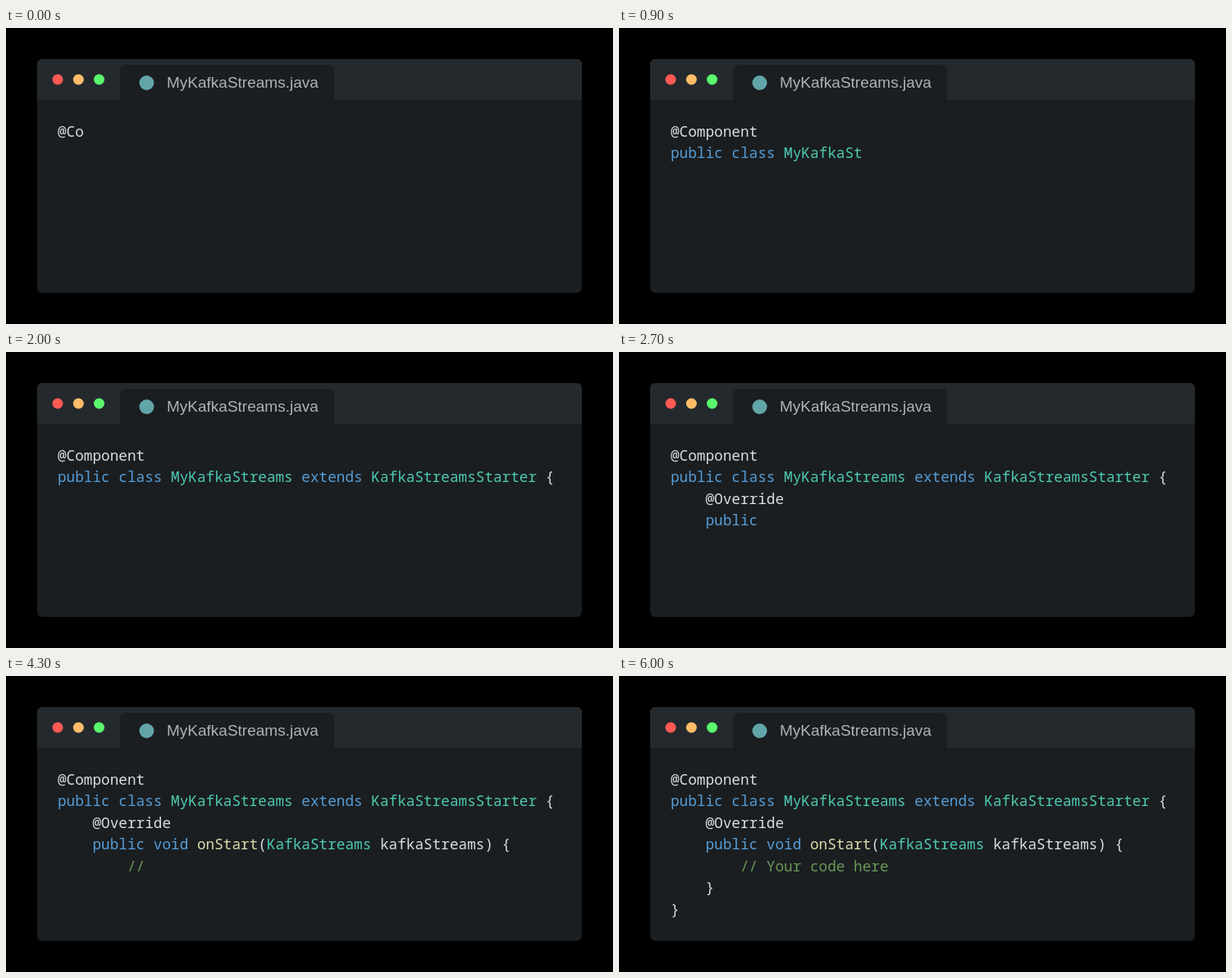
These frames come from a looping animation (740x362 px, 6200 ms). An HTML page with a canvas:

```html
<!DOCTYPE html>
<html lang="en">
<head>
<meta charset="utf-8">
<title>Typing code</title>
<style>
  html, body { margin: 0; width: 100%; height: 100%; overflow: hidden; background: #000; }
  canvas { display: block; }
</style>
</head>
<body>
<canvas id="stage" width="740" height="362"></canvas>
<script>
const ctx = document.getElementById('stage').getContext('2d');

const LOOP = 6200, TICK = 100, CHARS_PER_TICK = 10 / 3, FIRST_CHARS = 3;
const LEFT = 63, BASELINE = 132.5, CELL = 10.62, LINE = 26.55;
const PLAIN = '#dcdcdc', KEYWORD = '#569cd6', TYPE = '#4ec9b0',
      METHOD = '#dcdcaa', COMMENT = '#6a9955';

const code = [
  ['@Component\n', PLAIN],
  ['public class ', KEYWORD], ['MyKafkaStreams', TYPE],
  [' extends ', KEYWORD], ['KafkaStreamsStarter', TYPE], [' {\n', PLAIN],
  ['    @Override\n', PLAIN],
  ['    public void ', KEYWORD], ['onStart', METHOD], ['(', PLAIN],
  ['KafkaStreams', TYPE], [' kafkaStreams) {\n', PLAIN],
  ['        // Your code here\n', COMMENT],
  ['    }\n}', PLAIN]
];
const chars = code.flatMap(([text, color]) => [...text].map(char => ({ char, color })));

function panel(x, y, w, h, radii, color) {
  ctx.fillStyle = color;
  ctx.beginPath();
  ctx.roundRect(x, y, w, h, radii);
  ctx.fill();
}

function dot(x, y, r, color) {
  ctx.fillStyle = color;
  ctx.beginPath();
  ctx.arc(x, y, r, 0, Math.PI * 2);
  ctx.fill();
}

function drawWindow() {
  ctx.fillStyle = '#000';
  ctx.fillRect(0, 0, 740, 362);
  panel(38, 38, 664, 286, 6, '#1a1e21');
  panel(38, 38, 664, 50, [6, 6, 0, 0], '#24292d');
  panel(139, 45, 261, 43, [6, 6, 0, 0], '#1a1e21');
  dot(63, 63, 6.5, '#ff5a54');
  dot(88.3, 63, 6.5, '#ffbd69');
  dot(113.5, 63, 6.5, '#5af66d');
  dot(171.5, 67, 9, '#62a5a8');
  ctx.font = '19px "Liberation Sans", Arial, sans-serif';
  ctx.fillStyle = '#b0b2b3';
  ctx.fillText('MyKafkaStreams.java', 196, 73);
}

function drawCode(count) {
  ctx.font = '17.7px "Noto Sans Mono", monospace';
  let col = 0, row = 0;
  for (const { char, color } of chars.slice(0, count)) {
    if (char === '\n') {
      col = 0;
      row++;
      continue;
    }
    ctx.fillStyle = color;
    ctx.fillText(char, LEFT + col++ * CELL, BASELINE + row * LINE);
  }
}

function render(now) {
  const tick = Math.floor((now % LOOP) / TICK);
  drawWindow();
  drawCode(Math.ceil(FIRST_CHARS + tick * CHARS_PER_TICK - 1e-6));
  requestAnimationFrame(render);
}

const start = performance.now();
render(0);
function frame() {}
</script>
</body>
</html>
```
